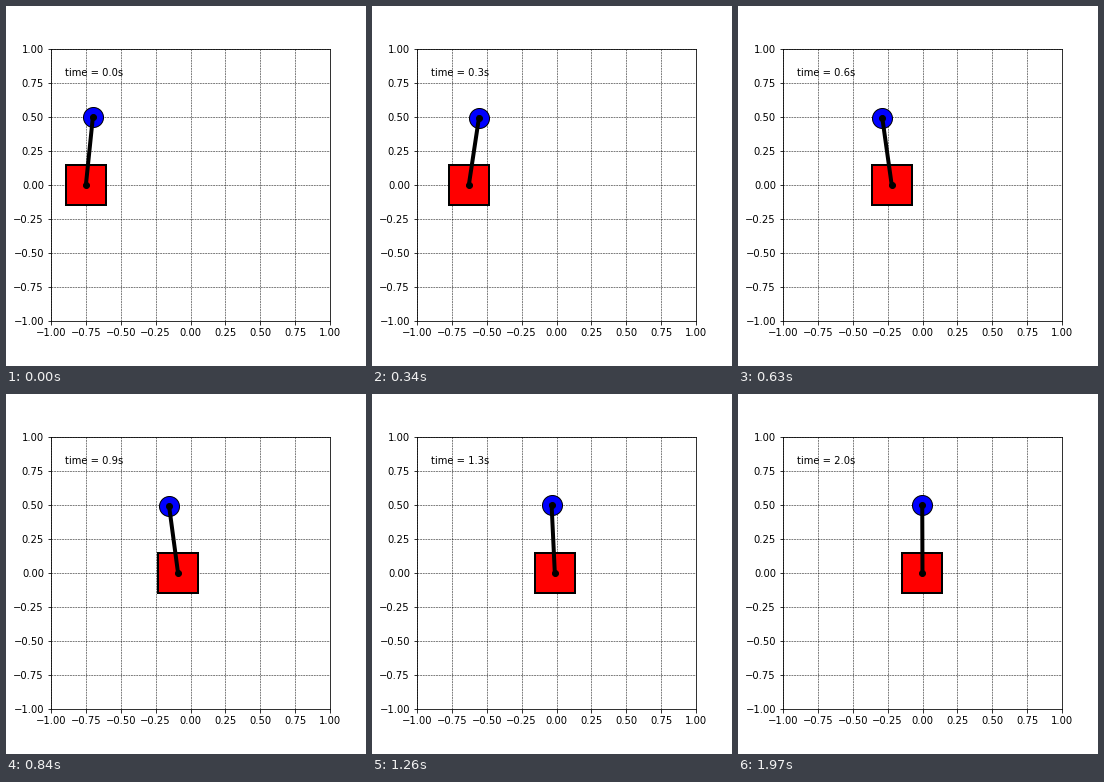
Animation of 360x360 px, one loop 2010 ms. Source, as a matplotlib script:

```python
import numpy as np
import matplotlib.pyplot as plt
from matplotlib.animation import FuncAnimation

FRAMES = 48
LOOP_MS = 2010
DURATION = 2.0
G, LENGTH = 9.81, 0.5
X0, THETA0 = -0.75, 0.1

# Linear closed loop of a cart-pole: the tip position is a sum of decaying modes
POLES = np.array([-4.2 + 0.9j, -4.2 - 0.9j, -10.4, -10.6])
START = [X0 + LENGTH * THETA0, 0, G * THETA0, 0]
MODES = np.linalg.solve(np.vander(POLES, increasing=True).T, START)


def pose(t):
    """Cart position and pole angle at time t."""
    decay = MODES * np.exp(POLES * t)
    tip = decay.sum().real
    theta = (decay * POLES**2).sum().real / G
    return tip - LENGTH * theta, theta


plt.rcParams.update({"font.family": "DejaVu Sans", "font.size": 10})
fig, ax = plt.subplots(figsize=(5, 5), dpi=72)
fig.subplots_adjust(left=0.125, right=0.9, bottom=0.125, top=0.88)
ticks = np.linspace(-1, 1, 9)
ax.set(xlim=(-1, 1), ylim=(-1, 1), xticks=ticks, yticks=ticks)
ax.grid(color="black", linestyle="--", linewidth=0.5)

cart, = ax.plot([], [], "s", ms=40, mfc="red", mec="black", mew=2)
bob, = ax.plot([], [], "o", ms=20, mfc="blue", mec="black", mew=1)
pole, = ax.plot([], [], "o-", color="black", lw=4, ms=6)
label = ax.text(0.05, 0.9, "", transform=ax.transAxes)


def update(i):
    t = DURATION * i / (FRAMES - 1)
    x, theta = pose(t)
    tip_x, tip_y = x + LENGTH * np.sin(theta), LENGTH * np.cos(theta)
    cart.set_data([x], [0])
    bob.set_data([tip_x], [tip_y])
    pole.set_data([x, tip_x], [0, tip_y])
    label.set_text(f"time = {t:.1f}s")
    return cart, bob, pole, label


anim = FuncAnimation(fig, update, frames=FRAMES, interval=LOOP_MS / FRAMES,
                     repeat=True, repeat_delay=0)
plt.show()
```
